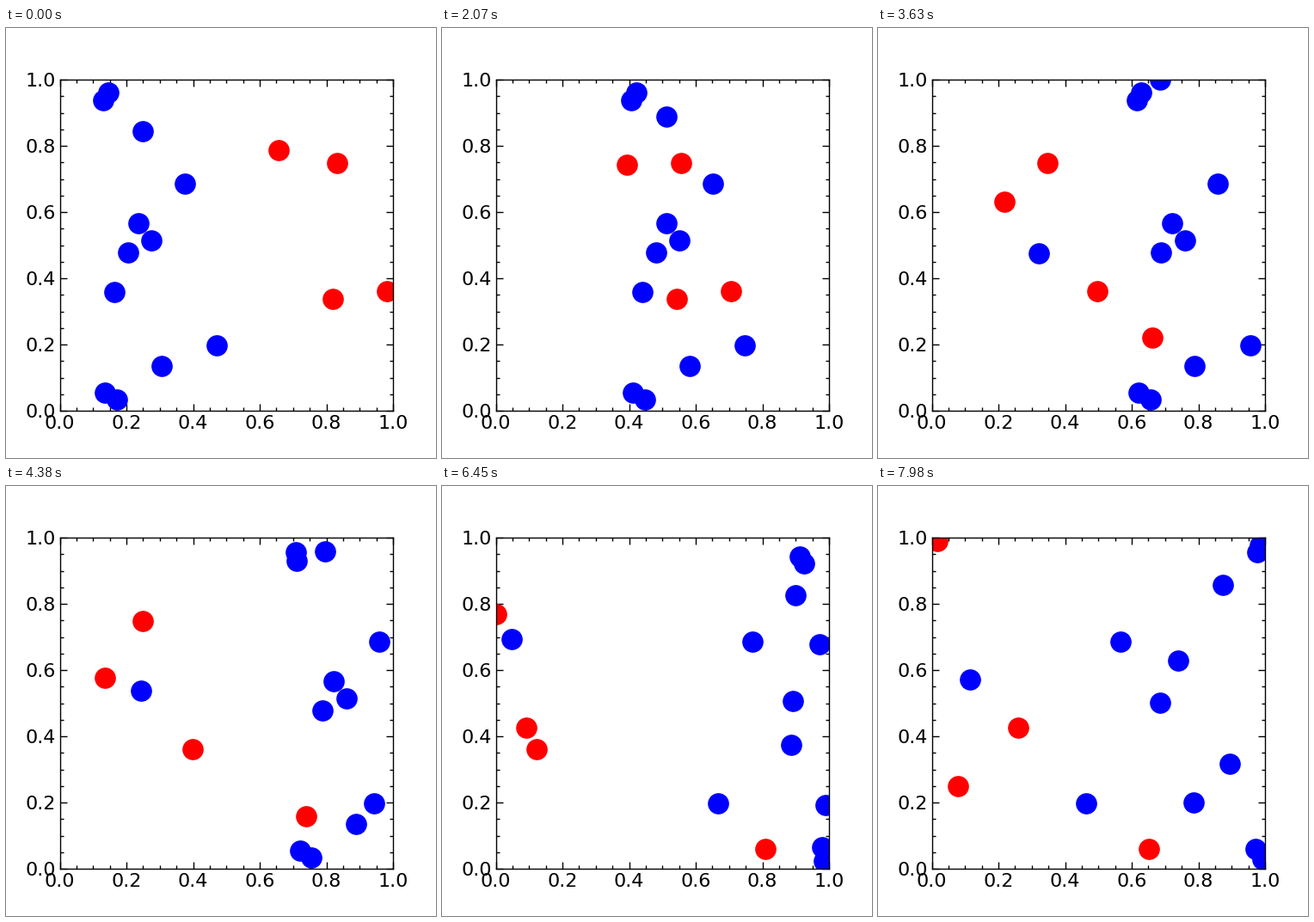
Write a matplotlib script that moves like this. It is 500 px wide and 500 px high and loops after 8000 ms.

```python
import numpy as np
import matplotlib.pyplot as plt
from matplotlib.animation import FuncAnimation
from matplotlib.ticker import MultipleLocator

LOOP_MS = 8000
FRAMES = 267
SPEED = 0.004   # box widths per step
RADIUS = 0.03

# Starting places: red balls fly left, blue balls fly right.
RED = [(0.6567, 0.7869), (0.8321, 0.748), (0.8196, 0.338), (0.982, 0.36)]
BLUE = [(0.1312, 0.9377), (0.1452, 0.9605), (0.2478, 0.8442),
        (0.375, 0.6857), (0.237, 0.566), (0.2755, 0.5145),
        (0.2045, 0.4779), (0.1638, 0.358), (0.4721, 0.1974),
        (0.305, 0.1351), (0.136, 0.0545), (0.1721, 0.0338)]


def collide(pos, vel):
    """Elastic bounce of equal masses; each ball answers its last contact."""
    gap = pos[:, None] - pos[None]
    touching = (gap ** 2).sum(axis=2) < (2 * RADIUS) ** 2
    np.fill_diagonal(touching, False)
    new = vel.copy()
    for i in np.flatnonzero(touching.any(axis=1)):
        j = np.flatnonzero(touching[i])[-1]
        d = gap[i, j]
        new[i] -= (vel[i] - vel[j]) @ d / (d @ d) * d
    return new


def bounce(pos, vel):
    vel = np.where(pos > 1, -np.abs(vel), vel)
    return np.where(pos < 0, np.abs(vel), vel)


def simulate():
    pos = np.array(RED + BLUE)
    vel = np.zeros_like(pos)
    vel[:, 0] = SPEED
    vel[:len(RED), 0] = -SPEED
    track = [pos]
    for _ in range(FRAMES - 1):
        vel = bounce(pos, collide(pos, vel))
        pos = pos + vel
        track.append(pos)
    return np.array(track)


track = simulate()

plt.rcParams.update({"font.family": "DejaVu Sans", "font.size": 16,
                     "axes.linewidth": 1})
fig = plt.figure(figsize=(5, 5), dpi=100, facecolor="white")
ax = fig.add_axes([0.125, 0.11, 0.775, 0.77])
ax.set(xlim=(0, 1), ylim=(0, 1))
for axis in (ax.xaxis, ax.yaxis):
    axis.set_major_locator(MultipleLocator(0.2))
    axis.set_minor_locator(MultipleLocator(0.05))
ax.tick_params(which="both", direction="in", top=True, right=True, width=1)
ax.tick_params(which="major", length=6)
ax.tick_params(which="minor", length=3)

size = 2 * RADIUS * ax.get_window_extent().width * 72 / fig.dpi
red_dots, = ax.plot([], [], "o", color="red", markersize=size)
blue_dots, = ax.plot([], [], "o", color="blue", markersize=size)


def draw(step):
    red_dots.set_data(*track[step, :len(RED)].T)
    blue_dots.set_data(*track[step, len(RED):].T)
    return red_dots, blue_dots


anim = FuncAnimation(fig, draw, frames=FRAMES, interval=LOOP_MS / FRAMES,
                     repeat=True, repeat_delay=0, blit=False)
plt.show()
```
